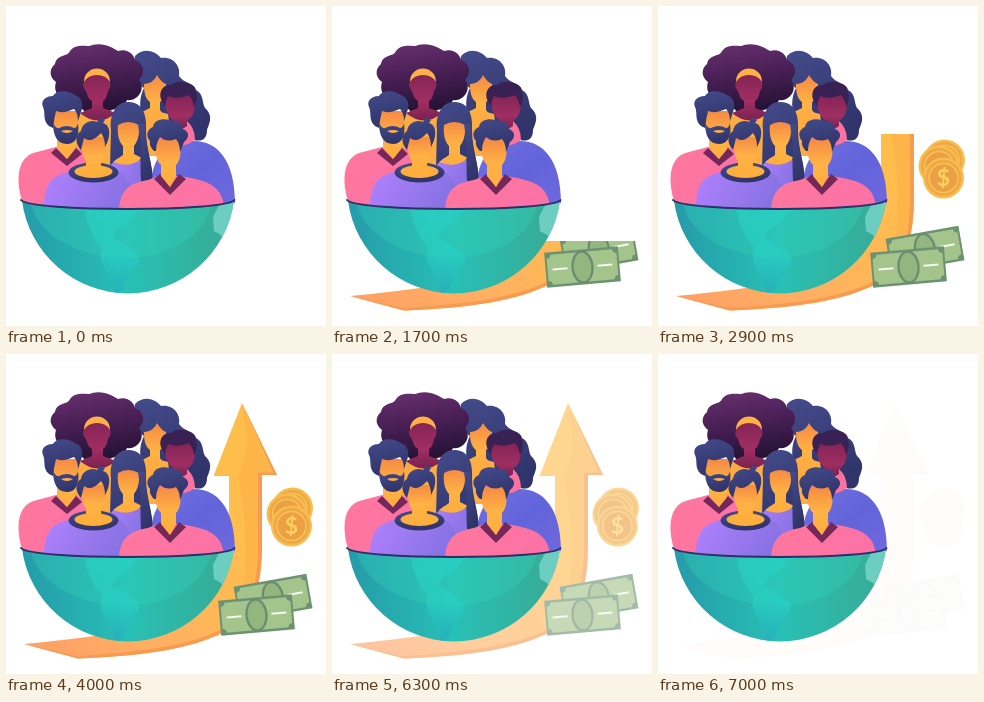
These frames come from a looping animation (320 by 320 pixels, 7.1 s). An HTML page:

```html
<!DOCTYPE html>
<html lang="en">
<head>
<meta charset="utf-8">
<title>Growing world population</title>
<style>
html, body { margin: 0; width: 100%; height: 100%; overflow: hidden; background: #fff; }
svg { display: block; width: 100vw; height: 100vh; }
.skin { fill: url(#skin); }
.dark { fill: url(#maroon); }
.navy { fill: url(#navy); }
.pink { fill: url(#pink); }
.collar { fill: #74285a; }
</style>
</head>
<body>
<svg viewBox="0 0 320 320">
  <defs>
    <linearGradient id="skin" x2="0" y2="1"><stop stop-color="#f58a45"/><stop offset=".5" stop-color="#ffb245"/><stop offset="1" stop-color="#ffae3c"/></linearGradient>
    <linearGradient id="maroon" x2="0" y2="1"><stop stop-color="#842456"/><stop offset=".6" stop-color="#a02e62"/><stop offset="1" stop-color="#7a2150"/></linearGradient>
    <linearGradient id="navy" x2=".3" y2="1"><stop stop-color="#434b8a"/><stop offset="1" stop-color="#30346a"/></linearGradient>
    <linearGradient id="plum" x2=".2" y2="1"><stop stop-color="#693170"/><stop offset=".5" stop-color="#4a2056"/><stop offset="1" stop-color="#281338"/></linearGradient>
    <linearGradient id="pink" x2="1" y2=".4"><stop stop-color="#ff789c"/><stop offset="1" stop-color="#fb72a6"/></linearGradient>
    <linearGradient id="lilac" x2="1" y2=".3"><stop stop-color="#b282ff"/><stop offset="1" stop-color="#8772e2"/></linearGradient>
    <linearGradient id="blue" x2="1" y2="1"><stop stop-color="#7470e0"/><stop offset=".5" stop-color="#6264da"/><stop offset="1" stop-color="#7068dd"/></linearGradient>
    <linearGradient id="sea"><stop stop-color="#2599a9"/><stop offset=".5" stop-color="#28c0b5"/><stop offset="1" stop-color="#3aa892"/></linearGradient>
    <linearGradient id="land" x2="0" y2="1"><stop stop-color="#28d2c4"/><stop offset=".6" stop-color="#28cfc4"/><stop offset="1" stop-color="#27a9bc"/></linearGradient>
    <linearGradient id="gold" gradientUnits="userSpaceOnUse" x1="18" y1="295" x2="240" y2="180"><stop stop-color="#ff9f66"/><stop offset=".5" stop-color="#ffb062"/><stop offset="1" stop-color="#ffbe4c"/></linearGradient>
    <clipPath id="bowl"><path d="M16 195C26 206 218 206 228 195A107 107 0 0 1 16 195Z"/></clipPath>
    <clipPath id="wipe"><rect id="curtain" width="320" height="320"/></clipPath>
    <g id="bill">
      <rect x="-37" y="-17.500" width="74" height="35" fill="#6d9272"/>
      <path d="M-31-15H31Q31-11.500 35-11V11Q31 11.500 31 15H-31Q-31 11.500-35 11V-11Q-31-11.500-31-15Z" fill="#a3c48b"/>
      <ellipse rx="10" ry="15.500" fill="#93b67f" stroke="#6a8d70" stroke-width="2.200"/>
      <path d="M-30 0H-15M15 0H30" stroke="#f4f8ee" stroke-width="2"/>
    </g>
    <g id="coin">
      <circle r="20.500" fill="#f8bd4e"/>
      <circle r="18" fill="#eda848"/>
      <circle r="14.500" fill="#eba046" stroke="#f9c255" stroke-width="1.500"/>
    </g>
  </defs>

  <g id="growth" clip-path="url(#wipe)">
    <path d="M236 49L271 121H256V195C255 250 238 270 212 281C176 297 130 302 72 304.500L18 290C48 287 70 285 100 280C170 274 223 248 223 190V122H207.500Z" fill="url(#gold)"/>
    <path d="M236 49L271 121H256V195C255 250 238 270 212 281C176 297 130 302 72 304.500L18 290L72 302C130 298 176 293 210 278C235 267 251 248 252 195V118.500H267Z" fill="#f89a50"/>
    <path d="M236 51L266 118.500H252V195C251 225 243 246 232 260C242 220 243 180 232 122Q247 95 236 51Z" fill="#fcae48" opacity=".5"/>
    <use href="#bill" transform="translate(267 243.500) rotate(-10)"/>
    <use href="#bill" transform="translate(250.500 261) rotate(-5)"/>
    <use href="#coin" transform="translate(286.500 154)"/>
    <use href="#coin" transform="translate(281 160)"/>
    <g transform="translate(285.500 172)">
      <use href="#coin"/>
      <text y="8" text-anchor="middle" font-family="Lato, sans-serif" font-weight="bold" font-size="23" fill="#ffd25e">$</text>
    </g>
  </g>

  <!-- back row -->
  <path class="navy" d="M129 50C138 41 149 45 155 52C167 50 175 60 173 70C178 78 189 77 190 84C198 88 196 97 199 102C208 110 203 118 201 124C201 133 196 136 188 134L145 128C134 115 131 95 138 82C130 77 127 60 129 50Z"/>
  <path d="M49 58C51 48 62 51 64 45C71 36 82 42 86 39C98 36 107 42 112 45C122 42 128 49 129 54C139 58 139 68 133 74C141 84 130 96 121 94C117 104 106 102 103 106H79C74 98 65 101 62 93C49 92 48 82 50 76C42 70 44 62 49 58Z" fill="url(#plum)"/>
  <path d="M64 125C66 112 74 107 82 104H101C111 107 116 114 120 128V165H64Z" fill="#fbac42"/>
  <path class="dark" d="M79 75C79 64 103 64 103 75C106 77 104 83 102 85C101 91 99 94 97 95V102L110 107Q92 122 74 107L86 102V95C82 93 81 88 80 85C77 82 76 77 79 75Z"/>
  <path d="M78 76C78 58 104 58 104 76Q100 69 91 69T78 76Z" fill="#ffb046"/>
  <path class="skin" d="M138 78C144 78 149 74 151 69Q155 76 160 78C161 90 157 94 154 96V104L164 117L133 124L136 106L144 102V96C139 92 138 86 138 78Z"/>
  <path d="M134 109Q145 102 162 108L168 150H136Z" fill="#ffad43"/>
  <path d="M143 200C143 150 158 140 178 136C206 130 229 148 229 197L150 202Z" fill="url(#blue)"/>
  <path d="M149 135C154 121 162 119 169 115H181Q189 122 189 134Q173 146 149 135Z" fill="#fa72a0"/>
  <path class="dark" d="M159 90H188C191 105 186 112 181 115V120Q174 126 168 119V115C162 111 158 102 159 90Z"/>
  <path d="M157 97C151 88 156 78 165 79C171 73 189 75 190 86C192 91 190 98 188 101Q187 94 183 89Q171 94 162 90Q159 96 159 101Z" fill="#3a2153"/>

  <!-- bearded man -->
  <path class="pink" d="M16 195C8 168 14 149 31 146L50 141H70L85 149V200Q42 204 16 195Z"/>
  <path class="collar" d="M45 147L61 160L76 148L70 142L61 153L50 142Z"/>
  <path class="skin" d="M47 105H72C73 121 71 130 69 133V143L61 153L51 142V133C47 125 46 115 47 105Z"/>
  <path class="navy" d="M47 117Q50 123 53 122Q61 118 68 122Q71 122 72 117C74 131 69 138 61 138C51 138 47 129 47 117ZM55 125Q61 129 67 125Q61 123 55 125Z" fill-rule="evenodd"/>
  <path class="navy" d="M43 120C36 114 40 107 37 101C34 93 42 90 47 90C52 82 65 86 69 89C78 92 77 102 75 106L72 115Q72 107 68 103Q57 108 50 105Q48 113 47 122Z"/>

  <!-- long-haired woman -->
  <path class="navy" d="M105 124C103 106 112 95 123 96C137 96 141 110 140 124C140 145 148 160 146 175Q141 179 136 175L104 162Z"/>
  <path d="M98 165L112 152H132L138 158V200H96Z" fill="url(#lilac)"/>
  <path class="skin" d="M112 119Q122 113 133 119C134 132 130 137 128 140V148L136 152Q124 163 107 156L117 149V140C113 136 111 128 112 119Z"/>
  <path class="navy" d="M132 118H139C139 145 148 160 146 175Q141 179 135 175Q134 160 135 140Z"/>

  <!-- man in lilac -->
  <path d="M38 199C39 175 48 169 66 165L78 160H98C116 163 126 172 128 203Q82 207 38 199Z" fill="url(#lilac)"/>
  <ellipse class="navy" cx="87.500" cy="166.500" rx="25" ry="10"/>
  <ellipse cx="87.500" cy="165.500" rx="19" ry="6.500" fill="#ffae3c"/>
  <path class="skin" d="M76 131H100C101 147 97 153 95 155V162L102 165Q87 174 74 165L80 161V155C76 150 75 140 76 131Z"/>
  <path class="navy" d="M75 144C68 136 70 128 75 125C76 117 85 113 91 116Q95 109 99 114L97 117C105 119 105 131 99 141Q99 132 95 127Q85 138 78 132Z"/>

  <!-- man in pink -->
  <path class="pink" d="M113 203C115 181 126 177 142 174L152 170H174C197 174 216 177 218 201Q167 209 113 203Z"/>
  <path class="collar" d="M148 173L164 189L180 173L173 168L164 181L154 168Z"/>
  <path class="skin" d="M150 133H174C176 150 173 156 170 159V170L164 181L155 170V159C149 153 148 142 150 133Z"/>
  <path class="navy" d="M148 145Q143 140 144 135C138 127 144 122 147 121C148 112 161 112 166 115C176 114 177 121 177 123C186 127 181 134 178 136L174 146Q174 138 170 133Q161 137 154 131Q150 137 150 145Z"/>

  <!-- globe -->
  <g clip-path="url(#bowl)">
    <path d="M10 190H235V290H10Z" fill="url(#sea)"/>
    <path d="M24 194H206C202 232 158 253 116 252C70 250 30 229 24 194Z" fill="#32d3b9" opacity=".3"/>
    <path d="M76 194H145L139 204L130 206L122 217L112 222L106 232L117 237L128 246C138 250 132 261 124 265L117 283L109 288L104 270C97 260 92 253 96 242L89 233L82 218Z" fill="url(#land)" opacity=".65"/>
    <path d="M207 211L213 199L230 194V230L219 238L215 229L208 225Z" fill="#78d8cb" opacity=".8"/>
  </g>
  <path d="M15 194C24 206 220 206 228.500 194" fill="none" stroke="#2c2f68" stroke-width="2" stroke-linecap="round"/>
</svg>
<script>
const LOOP = 7100;
const start = document.timeline.currentTime;

// steps: [time in ms, value]
function play(id, prop, steps) {
  const all = [[0, steps[0][1]], ...steps, [LOOP, steps.at(-1)[1]]];
  const frames = all.map(([t, value]) => ({ offset: t / LOOP, [prop]: value }));
  document.getElementById(id)
    .animate(frames, { duration: LOOP, iterations: Infinity }).startTime = start;
}

play('curtain', 'transform', [[750, 'translateY(320px)'], [4350, 'translateY(0px)']]);
play('growth', 'opacity', [[6000, 1], [6300, .62], [6600, .3], [7000, .03], [7090, 0]]);
</script>
</body>
</html>
```
